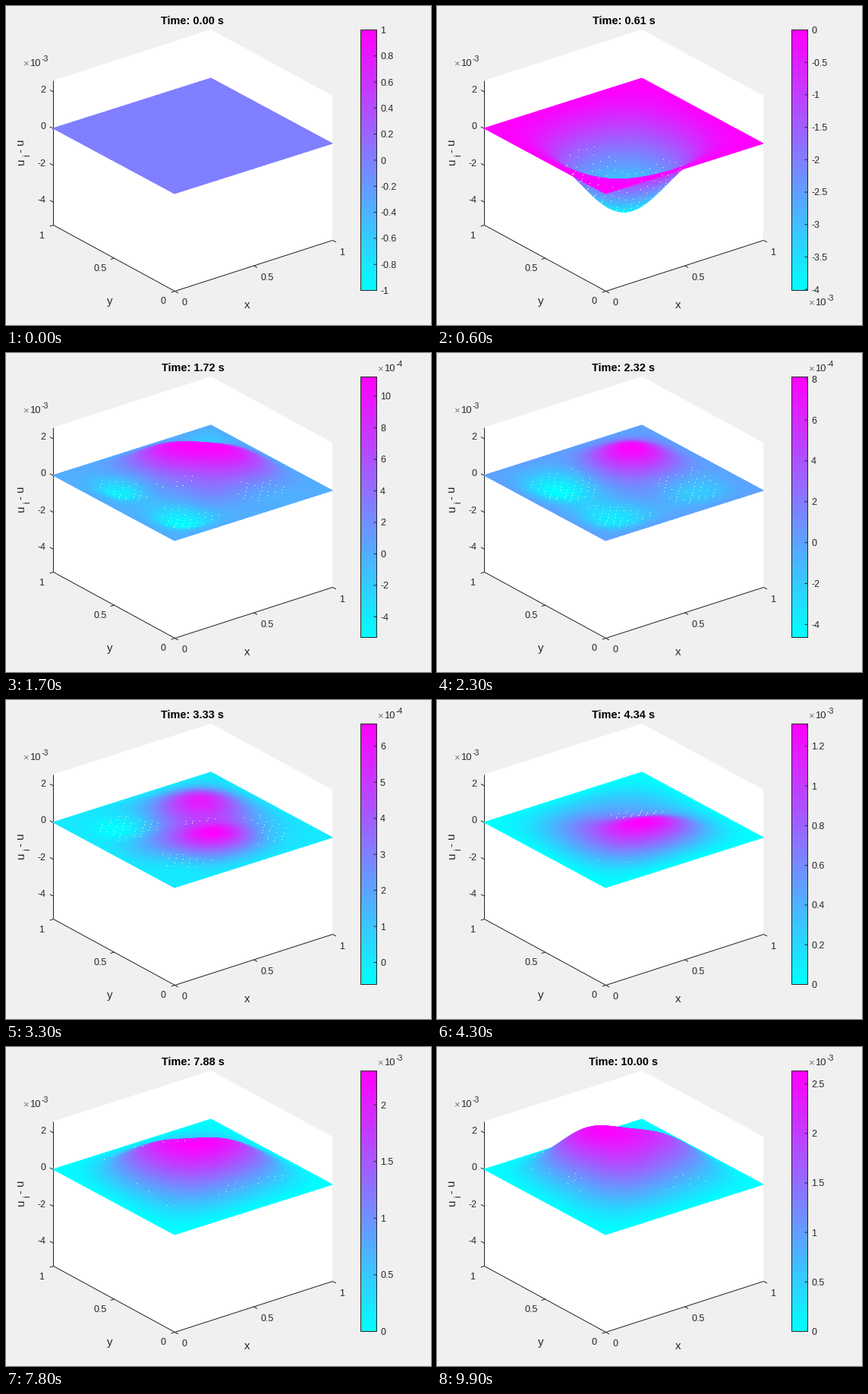
A matplotlib script that plays this animation: 560 px wide and 420 px high, repeating every 10 s.

```python
import numpy as np
import matplotlib.pyplot as plt
from matplotlib.animation import FuncAnimation
from matplotlib.patches import Polygon, Rectangle

W, H, DPI = 560, 420, 100
FRAMES = 100
PX = 72 / DPI
DARK = "#262626"
ZSCALE = 24.2  # pixels per 1e-3
N = 41
JUMP, REST, DOME = 1.2, 2.32, 4.34  # seconds at which the error changes character

plt.rcParams["font.family"] = "Liberation Sans"

fig = plt.figure(figsize=(W / DPI, H / DPI), dpi=DPI, facecolor="#f0f0f0")
ax = fig.add_axes([0, 0, 1, 1])
ax.axis("off")

axis = np.linspace(1, 0, N)  # far side first
X, Y = np.meshgrid(axis, axis)
TAPER = (1 - (2 * X - 1) ** 4) * (1 - (2 * Y - 1) ** 4)
HUMP = 16 * X * (1 - X) * Y * (1 - Y)
rows, cols = np.indices((N, N))
SPECKLE = (np.random.default_rng(4).random((N, N)) < .7) & ((rows + cols) % 2 == 0)


def project(x, y, z=0):
    return 222 + 208 * x - 160 * y, 247 - 66 * x - 86 * y - ZSCALE * z


def lerp(a, b, u):
    return a + (b - a) * u


def bump(x, y, sx, sy=None):
    return TAPER * np.exp(-((X - x) / sx) ** 2 / 2 - ((Y - y) / (sy or sx)) ** 2 / 2)


def dip(t):
    z = bump(.5, .5, .22)
    return z / z.max() * np.interp(t, (0, .4, 1.11), (0, -5.25, -1))


def settle(t):
    """Two crests merge on the diagonal while three hollows open in front."""
    u = np.clip((t - JUMP) / (REST - JUMP), 0, 1)
    z = sum(bump(lerp(x, .69, u), lerp(y, .68, u), lerp(.19, .17, u))
            for x, y in ((.4, .84), (.86, .36)))
    z -= lerp(.8, 0, u) * bump(.87, .87, .12)
    for x, y, depth in ((.22, .7, 1.2), (.21, .21, 1), (.75, .2, .6)):
        z += lerp(.25, -depth, u) * bump(x, y, lerp(.1, .15, u))
    z += lerp(.15, .25, u) * bump(.45, .3, .1)
    up, down = np.maximum(z, 0), np.minimum(z, 0)
    return up / up.max() * lerp(1.39, .811, u) - down / down.min() * lerp(.587, .465, u)


def dome(t):
    """Broad hump whose weight drifts from the front to the back left."""
    u = max(t - DOME, 0) / (10 - DOME)
    z = .5 * HUMP
    z = z + lerp(.9, .55, u) * bump(lerp(.5, .68, u), lerp(.25, .43, u), .19, lerp(.13, .17, u))
    z += lerp(.3, .75, u) * bump(lerp(.24, .36, u), lerp(.5, .63, u), .16)
    z += lerp(.25, .4, u) * bump(.34, .29, .15)
    return z / z.max() * np.interp(t, (DOME, 6.16, 7.88, 10), (1.311, 2.098, 2.3, 2.63))


def surface(t):
    if t < JUMP:
        return dip(t)
    w = np.clip((t - REST) / (DOME - REST), 0, 1)
    return lerp(settle(t), dome(t), w)


def text(x, y, s, size=12.5, ha="center", color=DARK, **kw):
    kw.setdefault("va", "center_baseline")
    return ax.text(x, y, s, fontsize=size * PX, ha=ha, color=color, **kw)


def line(p, q):
    return ax.plot([p[0] + .5, q[0] + .5], [p[1] + .5, q[1] + .5], color=DARK,
                   lw=PX, snap=False, solid_capstyle="butt")[0]


def exponent(x, y, n):
    return [text(x, y, "×", 13, "left", "#777777", va="baseline"),
            text(x + 9.5, y, "10", 13, "left", va="baseline"),
            text(x + 25, y - 6, str(n), 10.5, "left", va="baseline")]


def draw_box():
    corners = [(62, 98), (270, 31), (430, 118), (430, 308), (222, 375), (62, 288)]
    ax.add_patch(Polygon(corners, fc="white", ec="none", zorder=0))
    line((62, 98), (62, 288))
    line((62, 288), (222, 375))
    line((222, 375), (430, 308))
    for v in (2, 0, -2, -4):
        y = 161 - ZSCALE * v
        line((62, y), (57.4, y - 2.5))
        text(52, y - 3, str(v), ha="right")
    for i, s in enumerate(("0", "0.5", "1")):
        x, y = 222 - 80 * i, 375 - 43.5 * i
        line((x, y), (x - 4.8, y + 1.5))
        text(x - 15 - 2.5 * (i == 1), y + 13, s)
        x, y = 222 + 104 * i, 375 - 33.5 * i
        line((x, y), (x + 4.5, y + 2.4))
        text(x + 13 + 5 * (i == 1), y + 15, s)
    text(318, 393, "x", 15)
    text(137, 388, "y", 15)
    for x, y, s, size in ((20, 205, "u", 15), (28, 197, "i", 12), (20, 184, "- u", 15)):
        text(x, y, s, size, rotation=90, va="center")
    exponent(22, 79, -3)


def draw_bar():
    ax.imshow(np.linspace(1, 0, 256)[:, None], cmap="cool", aspect="auto",
              extent=(467, 489, 375, 31), interpolation="bilinear")
    ax.add_patch(Rectangle((467.5, 31.5), 21, 343, fill=False, ec=DARK, lw=PX,
                           snap=False, zorder=3))


def tick_step(span):
    base = 10.0 ** np.floor(np.log10(span / 11))
    return next(m * base for m in (1, 2, 5, 10) if span / (m * base) <= 11)


def tick_power(lo, hi):
    ends = [abs(v) for v in (lo, hi) if abs(v) > .1 * max(-lo, hi)]
    return int(np.floor(np.mean(np.log10(ends))))


def bar_ticks(lo, hi, scaled):
    power = tick_power(lo, hi) if scaled else 0
    step = tick_step(hi - lo)
    parts = []
    for n in range(int(np.ceil(lo / step - 1e-6)), int(np.floor(hi / step + 1e-6)) + 1):
        y = 374 - 343 * (n * step - lo) / (hi - lo)
        parts.append(line((484, y), (488, y)))
        parts.append(text(493, y + .5, f"{round(n * step / 10.0 ** power, 6) + 0:g}", 12.5, "left"))
    if scaled:
        parts += exponent(489, 24 if hi > 0 else 394, power - 3)
    return parts


def dots(z):
    d = -1 / (N - 1)
    zy, zx = np.gradient(z, d)
    bend = np.gradient(zx, d, axis=1) + np.gradient(zy, d, axis=0)
    facing = 66 * 160 + 86 * 208 + ZSCALE * (160 * zx + 208 * zy) > 0
    on = SPECKLE & facing & (bend > .06 * np.abs(bend).max()) & (TAPER > .6) & (X + Y < 1.3)
    px, py = project(X[on], Y[on], z[on])
    return ax.plot(px, py, ",", color="#ffffd0", zorder=2.5)[0]


draw_box()
draw_bar()
title = text(246, 18, "", 14.5, color="black", weight="bold")
ax.set_xlim(0, W)
ax.set_ylim(H, 0)
ax.autoscale(False)
live = []


def update(k):
    while live:
        live.pop().remove()
    t = 10 * k / (FRAMES - 1)
    title.set_text(f"Time: {t:.2f} s")
    z = surface(t)
    lo, hi = z.min(), z.max()
    flat = hi - lo < 1e-9
    if flat:
        lo, hi = -1, 1
    px, py = project(X, Y, z)
    live.append(ax.pcolormesh(px, py, z, shading="gouraud", cmap="cool",
                              vmin=lo, vmax=hi, zorder=2))
    if not flat:
        live.append(dots(z))
    live.extend(bar_ticks(lo, hi, not flat))
    return live


anim = FuncAnimation(fig, update, frames=FRAMES, init_func=lambda: [],
                     interval=100, repeat=True, repeat_delay=0, blit=False)
plt.show()
```
